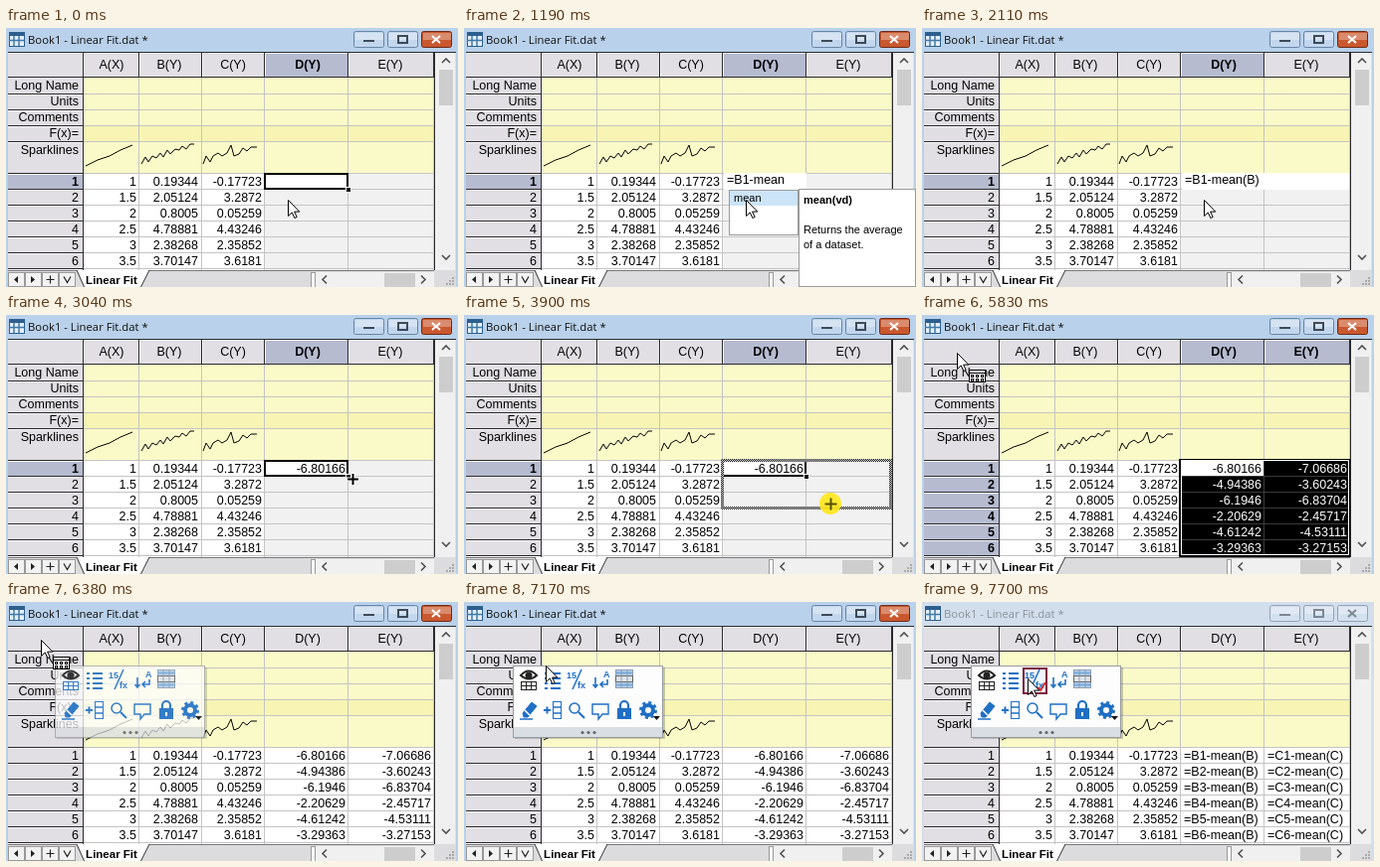
These frames come from a looping animation (454x261 px, 8000 ms). An HTML page:

```html
<!DOCTYPE html>
<html lang="en">
<head>
<meta charset="utf-8">
<title>Worksheet fill</title>
<style>
html, body { margin: 0; width: 100%; height: 100%; overflow: hidden; }
svg { display: block; width: 454px; height: 261px; }
text { font: 12.5px "Liberation Sans", Arial, sans-serif; white-space: pre; }
text.b { font-weight: bold; }
text.tab { font-size: 11.5px; font-weight: bold; }
text.title { font: 11.3px "Open Sans", "Noto Sans", sans-serif; }
text.s { font-size: 11px; }
text.i { font-size: 9px; font-weight: bold; }
rect { shape-rendering: crispEdges; }
rect.smooth { shape-rendering: auto; }
</style>
</head>
<body>
<svg id="stage" viewBox="0 0 454 261"></svg>
<script>
const LOOP = 8000;
const HEAD = '#e1dfe3', PICK = '#b6bbd0', LINE = '#c4c4c4', EDGE = '#2a2a2c', LIGHT = '#f8f8fa';
const YELLOW = '#fafac8', DEEP = '#f7f4b4', EMPTY = '#f1f1f2', BLUE = '#1f6fc4';
const COLS = [78, 134, 197, 260, 344, 430];
const NAMES = ['A(X)', 'B(Y)', 'C(Y)', 'D(Y)', 'E(Y)'];
const MIDS = [106, 164, 228, 303, 386];
const RIGHT = [131, 193, 257, 341, 427];
const LABELS = ['Long Name', 'Units', 'Comments', 'F(x)=', 'Sparklines'];
const DATA = [
  ['1', '1.5', '2', '2.5', '3', '3.5'],
  ['0.19344', '2.05124', '0.8005', '4.78881', '2.38268', '3.70147'],
  ['-0.17723', '3.2872', '0.05259', '4.43246', '2.35852', '3.6181'],
  ['-6.80166', '-4.94386', '-6.1946', '-2.20629', '-4.61242', '-3.29363'],
  ['-7.06686', '-3.60243', '-6.83704', '-2.45717', '-4.53111', '-3.27153']
];
const FORMULA = '=B1-mean(B)';
const KEYS = [170, 240, 410, 580, 730, 810, 960, 1040, 1350, 1580, 1810];
const rowY = r => 147 + 16 * r;

const box = (x, y, w, h, fill, more = '') =>
  `<rect x="${x}" y="${y}" width="${w}" height="${h}" fill="${fill}" ${more}/>`;
const text = (s, x, y, cls = '', anchor = 'start', fill = '#000') =>
  `<text x="${x}" y="${y}" class="${cls}" text-anchor="${anchor}" fill="${fill}">${s}</text>`;
const path = (d, stroke = '#000', w = 1, fill = 'none') =>
  `<path d="${d}" stroke="${stroke}" stroke-width="${w}" fill="${fill}"/>`;
const at = (x, y, s) => `<g transform="translate(${x} ${y})">${s}</g>`;

// Stepped travel: the first of n moves happens at start.
function step(t, start, end, n, total = n) {
  if (t < start) return 0;
  return Math.min(n, 1 + Math.floor((t - start) * (n - 1) / (end - start) + 0.01)) / total;
}
const mix = (a, b, k) => [a[0] + (b[0] - a[0]) * k, a[1] + (b[1] - a[1]) * k];

function pointer(t) {
  if (t < 2430) return mix([283, 173], [303, 162], step(t, 2190, 2430, 4));
  if (t < 3500) return mix([303, 162], [348, 165], step(t, 2810, 3040, 4));
  if (t < 4840) return mix([348, 164], [408, 241], t < 4510 ? step(t, 3670, 4430, 11, 12) : 1);
  if (t < 6760) return mix([405, 230], [35, 38], step(t, 5060, 5830, 11));
  return mix([35, 38], [106, 77], step(t, 6760, 7400, 9));
}

function titleButton(x, off, sign, close) {
  const fill = off ? '#d3e1ef' : close ? '#c9582f' : '#c2d7ee';
  const edge = off ? '#93a3b5' : close ? '#6e2a18' : '#6885a6';
  const ink = off ? '#7d8894' : close ? '#fff' : '#3e4a58';
  return box(x + .5, 3.5, 30, 16, fill, `class="smooth" rx="2" stroke="${edge}"`) +
    box(x + 1.5, 4.5, 28, 7, '#fff', 'opacity=".3"') + path(sign, ink, 2);
}

function frame(off) {
  return box(0, 0, 454, 261, off ? '#d2deeb' : '#b9d1ea') +
    box(3, 4, 15, 14, '#e6eff7', 'stroke="#2c5f8e"') + box(3, 4, 15, 4, '#2c5f8e') +
    path('M3 12.5h15M8 8v10M13 8v10', '#3f7aa8', 1.5) +
    text('Book1 - Linear Fit.dat *', 22, 16, 'title', 'start', off ? '#8a929b' : '#111') +
    titleButton(349, off, 'M359 13h11') + titleButton(383, off, 'M394 8h9v7h-9z') +
    titleButton(417, off, 'M428 8l8 7m0-7l-8 7', true) +
    box(2, 24, 450, 237, HEAD);
}

function scrollbars() {
  let s = box(430, 25, 1, 219, EDGE) + box(431, 25, 20, 219, '#f0f0f0') +
    box(435, 42, 14, 36, '#cdcdcd') +
    path('M438 35l4-4 4 4M438 229l4 4 4-4', '#505050', 1.6);
  s += box(2, 244, 450, 17, '#dcdcde') + box(2, 244, 428, 1, '#777');
  for (let i = 0; i < 4; i++) s += box(2.5 + 17 * i, 246.5, 16, 14, '#f2f2f2', 'stroke="#999"');
  s += path('M12 250v7l-4-3.5zM25 250v7l4-3.5z', 'none', 0, '#222') +
    path('M40.5 253.5h8m-4-4v8M58 250.5l3.5 6 3.5-6', '#222', 1.2) +
    path('M71 244l8 18h56l9-18', '#333', 1, '#fff') + text('Linear Fit', 106, 258, 'tab', 'middle');
  s += box(306, 246, 4, 15, '#f8f8f8', 'stroke="#999"') + box(311, 246, 119, 15, '#f0f0f0') +
    box(380, 247, 31, 14, '#cdcdcd') +
    path('M322 249.5l-4 4 4 4M417 249.5l4 4-4 4', '#505050', 1.6);
  for (let i = 0; i < 3; i++) for (let j = 0; j <= i; j++)
    s += box(448 - 3 * j, 251 + 3 * i, 2, 2, '#aaa');
  return s;
}

function sheet(t) {
  const filled = t >= 4840, selected = filled && t < 6140, none = t >= 6140;
  const active = t >= 2190 && t < 2660 ? 1 : 0;
  const formulas = t >= 7620;
  let s = box(78, 50, 352, 97, YELLOW) + box(78, 98, 352, 16, DEEP) + box(78, 147, 352, 98, '#fff');
  if (!filled) {
    s += box(260, 147, 170, 98, EMPTY);
    if (t < 170 || t >= 2190) s += box(260, 147, 84, 16, '#fff');
  }
  // Column heads
  COLS.slice(0, 5).forEach((x, c) => {
    const on = !none && (c === 3 || selected && c === 4);
    s += box(x, 25, COLS[c + 1] - x, 24, on ? PICK : HEAD) + box(x, 25, 1, 24, LIGHT) +
      text(NAMES[c], MIDS[c], 41, on ? 'b' : '', 'middle');
  });
  s += box(2, 25, 428, 1, LIGHT);
  // Row heads
  if (!none) s += box(2, rowY(selected ? 0 : active), 75, selected ? 97 : 15, PICK);
  // Grid
  for (const y of [66, 82, 98, 114, 146, ...DATA[0].map((_, r) => rowY(r) + 15)])
    s += box(78, y, 352, 1, LINE) + box(2, y, 75, 1, EDGE) + box(2, y + 1, 75, 1, LIGHT);
  for (const x of COLS.slice(1)) s += box(x - 1, 50, 1, 195, LINE) + box(x - 1, 25, 1, 24, EDGE);
  s += box(77, 25, 1, 220, EDGE) + box(2, 49, 428, 1, EDGE) + box(2, 24, 450, 1, EDGE);
  LABELS.forEach((l, i) => s += text(l, 73, [62, 78, 94, 110, 127][i], '', 'end'));
  for (let r = 0; r < 6; r++) {
    const on = !none && (selected || r === active);
    s += text(r + 1, 73, rowY(r) + 12, on ? 'b' : '', 'end');
  }
  // Sparklines
  s += path('M80 139L92 133 104 129 115 123 127 118') +
    path('M136 137l4-7 3 5 4-6 4 2 4-5 3 4 4-7 3 4 5-5 4 1 3-4 4 3 4-5h4') +
    path('M198 137l3-8 4 6 3-6 5-3 4 3 5-3 4-8 3 11 5-2 4-6 4 3 4-4h6');
  // Selection
  if (selected) {
    s += box(258, 145, 173, 100, '#000');
    for (let r = 0; r < 5; r++) s += box(261, rowY(r) + 15, 168, 1, '#3b3b3b');
    s += box(343, 147, 1, 95, '#3b3b3b') + box(260, 147, 83, 15, '#fff') +
      box(260.5, 146.5, 168, 95, 'none', 'stroke="#fff"');
  }
  // Values
  for (let c = 0; c < 5; c++) for (let r = 0; r < 6; r++) {
    if (c > 2 && !filled && !(t >= 2190 && c === 3 && r === 0)) continue;
    const y = rowY(r) + 12;
    if (formulas && c > 2) {
      const k = 'BC'[c - 3];
      s += text(`=${k}${r + 1}-mean(${k})`, COLS[c] + 3, y);
    } else {
      const white = selected && c > 2 && c + r > 3;
      s += text(DATA[c][r], RIGHT[c], y, '', 'end', white ? '#fff' : '#000');
    }
  }
  const editing = t >= 170 && t < 2190;
  if (!filled && !editing) {
    const y = rowY(active);
    s += box(260, y, 83, 15, 'none', 'stroke="#000" stroke-width="2"') +
      box(341, y + 13, 5, 5, '#000', 'stroke="#fff"');
  }
  if (editing) {
    s += box(261, 146, t >= 1810 ? 168 : 83, 17, '#fff') +
      text(FORMULA.slice(0, KEYS.filter(k => t >= k).length), 264, 157);
  }
  return s;
}

function hints(t) {
  const border = 'stroke="#9a9a9a"';
  let s = '';
  if (t >= 1040 && t < 1350) s += box(266.5, 163.5, 69, 45, '#fff', border) +
    box(267, 164, 68, 15, '#cce4f7') + text('mean', 271, 175, 's');
  if (t >= 1190 && t < 1350) s += box(336.5, 162.5, 117, 98, '#fff', border) +
    ['mean(vd)', '', 'Returns the average', 'of a dataset.'].map((l, i) =>
      text(l, 341, 177 + 15 * i, i ? 's' : 's b')).join('');
  if (t >= 1430 && t < 1960) s += box(290.5, 161.5, 65, 15, '#fff', border) + text('mean(vd)', 295, 173, 's');
  return s;
}

function marquee(t) {
  if (t < 3500 || t >= 4840) return '';
  const y = pointer(t)[1], far = t >= 3670;
  const rows = far ? 1 + Math.min(5, Math.floor((y - 147) / 16)) : 1;
  return box(259.5, 146.5, far ? 169 : 84, rows * 16, 'none', 'stroke="url(#hatch)" stroke-width="3"');
}

const grid = (x, y, w, h, c) => box(x, y, w, h, '#fff', `stroke="${c}"`) +
  path(`M${x} ${y + h / 2}h${w}M${x + w / 3} ${y}v${h}M${x + w * 2 / 3} ${y}v${h}`, c);

function toolbar(t) {
  if (t < 6380) return '';
  const [x, y] = pointer(t), over = x >= 49 && y >= 64;
  const hot = t >= 7320, pressed = t >= 7550;
  const icons = [
    [65, 78, path('M-8-4Q0-13 8-4Q0 3-8-4z', '#222', 2) + '<circle cy="-4" r="3.5" fill="#222"/>' +
      grid(-7.5, 2.5, 15, 8, over ? '#222' : BLUE)],
    [89, 78, path('M-8-6h3m3 0h10M-8-1h3m3 0h10M-8 4h3m3 0h10M-8 9h3m3 0h10', BLUE, 2)],
    [113, 78, (hot ? box(-11.5, -11.5, 23, 25, '#f0f5fc', 'stroke="#7c1f3f" stroke-width="2"') : '') +
      text('15', -10, -1, 'i', 'start', BLUE) + path('M5-10l-9 20', BLUE, 1.5) +
      text('fx', 1, 9, 'i', 'start', BLUE) + (pressed ? path('M3 8l3 3 5-8', '#d62b2b', 2) : '')],
    [138, 78, path('M-6-2v9m-2.5-2l2.5 3 2.5-3M-1 5h7V0M2 2L-1 5l3 3', BLUE, 1.6) +
      text('A', 2, -2, 'i', 'start', BLUE)],
    [161, 78, box(-8.5, -9.5, 17, 18, '#fff', 'stroke="#8a9cb0"') +
      path('M-8-6.5H8M-8 5.5H8', '#86b4e2', 4) + box(-8.5, -3.5, 17, 6, '#dfe3e8', 'stroke="#666"') +
      path('M-3-9v18m6-18v18', '#8a9cb0')],
    [65, 109, path('M-6 3L3-8l5 4-9 11h-4z', BLUE, 1, BLUE) + path('M-4 0l5 5', '#fff', 1.5) +
      path('M-9 9h13', BLUE, 1.5)],
    [89, 109, path('M-9 0h7m-3.5-3.5v7', BLUE, 2) + box(.5, -8.5, 8, 17, '#fff', `stroke="${BLUE}" stroke-width="1.5"`) +
      path('M0-3h9M0 3h9', BLUE, 1.5)],
    [113, 109, `<circle cx="-2" cy="-2" r="5" fill="none" stroke="${BLUE}" stroke-width="1.5"/>` +
      path('M2 2l6 6', BLUE, 2)],
    [137, 109, path('M-8-6H8V4H2l-4 5V4h-6z', BLUE, 1.4)],
    [161, 109, path('M-4-1v-4a4 4 0 0 1 8 0v4', BLUE, 2.2) + box(-7, -2, 14, 11, BLUE) + box(-1, 2, 2, 4, '#fff')],
    [185, 109, `<circle r="5" fill="none" stroke="${BLUE}" stroke-width="4"/>` +
      `<circle r="7.5" fill="none" stroke="${BLUE}" stroke-width="3" stroke-dasharray="2.945"/>` +
      path('M5 6h7l-3.5 4z', 'none', 0, '#111')]
  ];
  const dots = [119, 125, 131].map(cx => `<circle cx="${cx}" cy="131.5" r="1.6" fill="#666"/>`).join('');
  return `<g opacity="${over ? 1 : .75}">` + box(51, 66, 151, 72, '#000', 'opacity=".2"') +
    box(49.5, 64.5, 150, 72, '#fdfdfe', 'stroke="#9a9ca2"') + box(50, 126, 149, 10, '#d9dde4') + '</g>' +
    `<g opacity="${over ? 1 : .9}">` + dots + icons.map(i => at(...i)).join('') + '</g>';
}

function cursor(t) {
  const [x, y] = pointer(t);
  const cross = t >= 3040 && t < 4840;
  const click = t >= 3500 && t < 4840 || t >= 6070 && t < 6210 || t >= 7550 && t < 7700;
  let s = click ? '<circle r="11" fill="#ffe81a" opacity=".9"/>' : '';
  if (cross) s += click ? path('M-5.5.5h12M.5-5.5v12', '#5a5200', 2)
    : path('M-6 .5h13M.5-6v13', '#fff', 4) + path('M-5 .5h11M.5-5v11', '#000', 2);
  else {
    s += path('M.5.5v16l3.8-3.6 2.6 5.6 2.3-1-2.6-5.4h5.2z', '#000', 1, '#fff');
    if (t >= 5830 && y < 50) s += at(12, 17, box(.5, .5, 16, 12, '#fff', 'stroke="#000"') + box(1, 3, 15, 1, '#000') +
      [2, 7, 12].map(i => box(i + .5, 5.5, 2, 2, '#fff', 'stroke="#000"') +
        box(i + .5, 9.5, 2, 2, '#fff', 'stroke="#000"')).join(''));
  }
  return at(Math.round(x), Math.round(y), s);
}

const HATCH = '<defs><pattern id="hatch" width="2" height="2" patternUnits="userSpaceOnUse">' +
  box(0, 0, 2, 2, '#d4d4d4') + box(0, 0, 1, 1, '#222') + box(1, 1, 1, 1, '#222') + '</pattern></defs>';
const stage = document.getElementById('stage');
let shown = '';

function draw(t) {
  const next = HATCH + frame(t >= 7550) + sheet(t) + scrollbars() + marquee(t) + hints(t) + toolbar(t) + cursor(t);
  if (next !== shown) stage.innerHTML = shown = next;
}

const begin = performance.now();
function tick() {
  draw((performance.now() - begin) % LOOP);
  requestAnimationFrame(tick);
}
tick();
</script>
</body>
</html>
```
